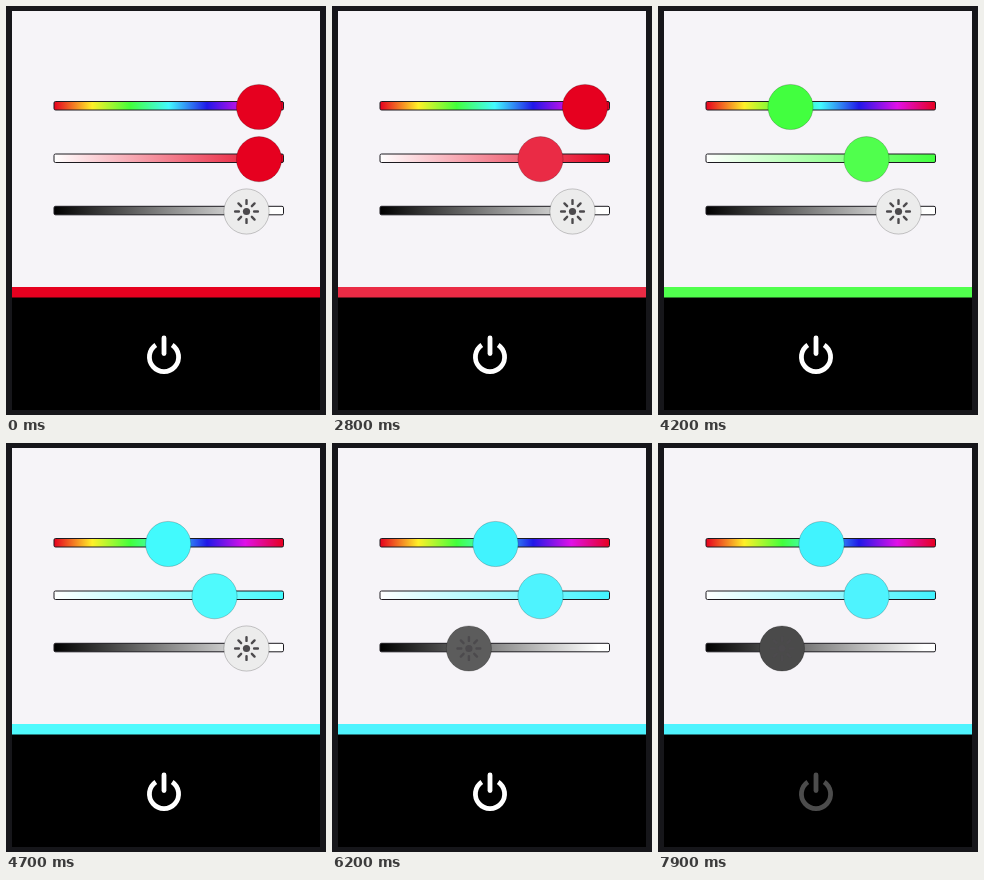
Write an HTML page that moves like this. It is 320x409 px and loops after 8 s.

```html
<!DOCTYPE html>
<html lang="en">
<head>
<meta charset="utf-8">
<title>Light control</title>
<style>
  html, body { margin: 0; width: 100%; height: 100%; overflow: hidden; background: #16161a; }
  svg { display: block; width: 100%; height: 100%; }
  .track { stroke: #1c1a20; stroke-width: 1; }
  .thumb { stroke: rgba(0, 0, 0, .2); stroke-width: 1; }
</style>
</head>
<body>
<svg viewBox="0 0 320 409">
  <defs>
    <linearGradient id="hueFill"></linearGradient>
    <linearGradient id="satFill">
      <stop offset="0" stop-color="#fff"/>
      <stop offset="1" id="satEnd"/>
    </linearGradient>
    <linearGradient id="lightFill">
      <stop offset="0" stop-color="#000"/>
      <stop offset=".48" stop-color="#858585"/>
      <stop offset=".95" stop-color="#fff"/>
    </linearGradient>
  </defs>
  <rect width="320" height="409" fill="#16161a"/>
  <rect x="6" y="5" width="308" height="277" fill="#f6f4f8"/>
  <rect id="strip" x="6" y="281" width="308" height="11"/>
  <rect x="6" y="291.5" width="308" height="112.5" fill="#000"/>

  <rect class="track" x="48" y="95.5" width="229.5" height="8.5" rx="1.5" fill="url(#hueFill)"/>
  <rect class="track" x="48" y="148" width="229.5" height="8.5" rx="1.5" fill="url(#satFill)"/>
  <rect class="track" x="48" y="200.3" width="229.5" height="8.5" rx="1.5" fill="url(#lightFill)"/>

  <circle class="thumb" id="hueThumb" cy="101" r="22.6"/>
  <circle class="thumb" id="satThumb" cy="153.2" r="22.6"/>
  <g id="lightThumb">
    <circle class="thumb" id="lightDisc" r="22.6"/>
    <circle r="3.6" fill="#4c4a4d"/>
    <path id="rays" stroke="#4c4a4d" stroke-width="2.4" stroke-linecap="round"/>
  </g>

  <g id="power" fill="none" stroke-width="4.8">
    <path d="M149.8 338.9A14.6 14.6 0 1 0 166.2 338.9"/>
    <path d="M158 332V347.5" stroke-linecap="round"/>
  </g>
</svg>
<script>
const LOOP = 8000, LEFT = 71, SPAN = 183;
const WHEEL = [
  [230, 0, 31], [255, 240, 40], [66, 255, 60], [66, 250, 255],
  [32, 24, 232], [224, 16, 232], [230, 0, 31]
];

// Thumb positions as [time, x] keys
const HUE = [[3580, 253], [4180, 132.5], [4350, 132.5], [4750, 163.5]];
const SAT = [[2520, 253], [2800, 208.5]];
const LIGHT = [[5500, 240.5], [5700, 177.5], [6000, 150], [6400, 124]];
const POWER = [[7250, 255], [7500, 76]];

const $ = id => document.getElementById(id);
const lerp = (a, b, k) => a + (b - a) * k;
const mix = (a, b, k) => a.map((v, i) => lerp(v, b[i], k));
const rgb = c => `rgb(${c.map(Math.round)})`;
const grey = v => rgb([v, v, v]);
const ease = k => k * k * (3 - 2 * k);
const share = x => Math.min(1, Math.max(0, (x - LEFT) / SPAN));

function at(keys, t) {
  if (t <= keys[0][0]) return keys[0][1];
  for (let i = 1; i < keys.length; i++) {
    const [t0, a] = keys[i - 1], [t1, b] = keys[i];
    if (t < t1) return lerp(a, b, ease((t - t0) / (t1 - t0)));
  }
  return keys[keys.length - 1][1];
}

function hueColor(h) {
  const p = h * 6, i = Math.min(5, Math.floor(p));
  return mix(WHEEL[i], WHEEL[i + 1], p - i);
}

function tint(color, s) {
  const room = 1 - Math.min(...color) / 110;
  return mix(color, [255, 255, 255], (1 - s) * .68 * room);
}

$('hueFill').innerHTML = WHEEL.map((c, i) =>
  `<stop offset="${i / 6}" stop-color="${rgb(c)}"/>`).join('');

$('rays').setAttribute('d', Array.from({ length: 8 }, (_, i) => {
  const a = i * Math.PI / 4, x = Math.cos(a), y = Math.sin(a);
  return `M${x * 7.6} ${y * 7.6}L${x * 11.4} ${y * 11.4}`;
}).join(''));

function draw(t) {
  const hueX = at(HUE, t), satX = at(SAT, t), lightX = at(LIGHT, t);
  const hue = hueColor(hueX === 253 ? 1 : share(hueX));
  const tone = rgb(tint(hue, satX === 253 ? 1 : share(satX)));
  $('hueThumb').setAttribute('cx', hueX);
  $('hueThumb').setAttribute('fill', rgb(hue));
  $('satThumb').setAttribute('cx', satX);
  $('satThumb').setAttribute('fill', tone);
  $('satEnd').setAttribute('stop-color', rgb(hue));
  $('strip').setAttribute('fill', tone);
  $('lightThumb').setAttribute('transform', `translate(${lightX} 205.5)`);
  $('lightDisc').setAttribute('fill', grey(share(lightX) * 255));
  $('power').setAttribute('stroke', grey(at(POWER, t)));
}

const start = performance.now();
function tick() {
  draw((performance.now() - start) % LOOP);
  requestAnimationFrame(tick);
}
tick();
</script>
</body>
</html>
```
